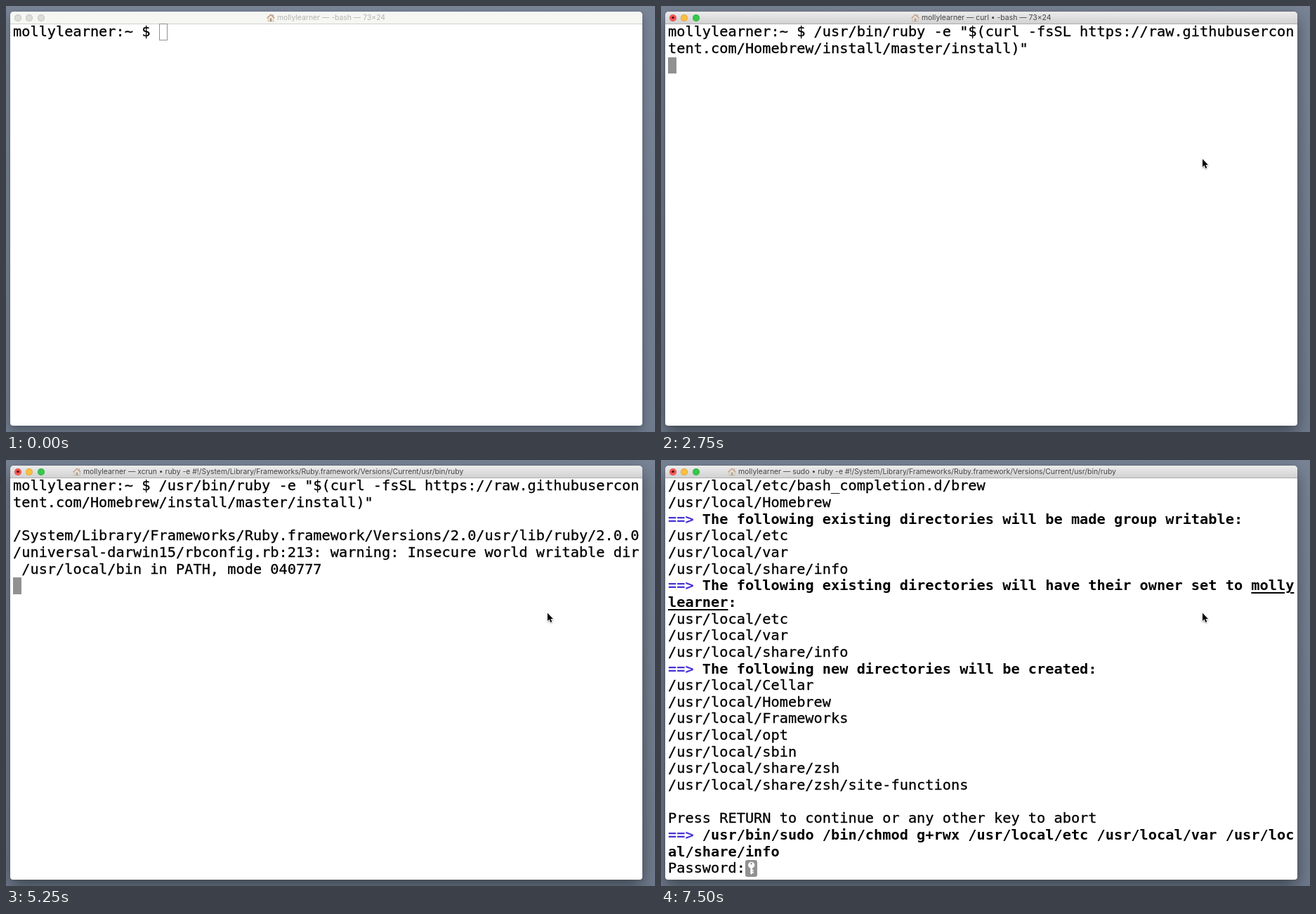
Recreate the animation shown at these times as an HTML page. Size 924 px wide and 606 px high, loop 8 s.

```html
<!DOCTYPE html>
<html lang="en">
<head>
<meta charset="utf-8">
<title>Terminal</title>
<style>
html, body { margin: 0; width: 100%; height: 100%; overflow: hidden; }
body { position: relative; background: linear-gradient(#788496, #6f7b8d); }
#window {
  position: absolute; left: 6px; top: 8px; width: 900px; height: 589px;
  border-radius: 5px 5px 4px 4px; background: #fff;
  box-shadow: 0 10px 24px rgba(0, 0, 0, .45), 0 0 1px rgba(0, 0, 0, .5);
}
#bar {
  box-sizing: border-box; height: 18px; border-radius: 5px 5px 0 0;
  background: linear-gradient(#ececec, #d2d2d2); border-bottom: 1px solid #adadad;
}
.light {
  position: absolute; top: 3.5px; width: 10px; height: 10px; border-radius: 50%;
  box-shadow: inset 0 0 0 .7px rgba(0, 0, 0, .15);
}
.close { left: 6px; background: #fc5b57; }
.minimize { left: 22.3px; background: #fdbe41; }
.zoom { left: 38.6px; background: #34c84a; }
.busy .close::after {
  content: ""; position: absolute; left: 3.2px; top: 3.2px;
  width: 3.6px; height: 3.6px; border-radius: 50%; background: #5c0503;
}
#title {
  position: absolute; top: 2px; height: 13px;
  font: 10.4px/13px Inter, Roboto, sans-serif; color: #444;
}
#title svg { position: absolute; left: 0; top: .5px; }
#label { position: absolute; left: 15px; top: 0; white-space: pre; }
.busy #title svg { opacity: .5; }
.inactive { box-shadow: 0 6px 14px rgba(0, 0, 0, .3), 0 0 1px rgba(0, 0, 0, .4) !important; }
.inactive #bar { background: #f6f7f3; border-color: #cfcfcf; }
.inactive .light { background: #dcdcda; }
.inactive #title { color: #b3b3b3; }
.inactive #title svg { opacity: .65; }
#screen {
  position: absolute; left: 10px; top: 25.3px; margin: 0; color: #000;
  font: 20.29px/23.65px "DejaVu Sans Mono", monospace;
  -webkit-text-stroke: .3px;
}
#screen b { -webkit-text-stroke: 0; }
#screen i { font-style: normal; color: #4632d5; }
#screen u { text-decoration-thickness: 1.6px; text-underline-offset: 2.5px; }
#caret { position: absolute; box-sizing: border-box; width: 12.2px; height: 23.6px; background: #919191; }
#caret svg { display: none; }
#caret.hollow { background: none; border: 1px solid #919191; }
#caret.secret { width: 17.5px; border-radius: 3px; }
#caret.secret svg { display: block; }
#pointer { position: absolute; filter: drop-shadow(0 1px .8px rgba(0, 0, 0, .35)); }
</style>
</head>
<body>
<div id="window">
  <div id="bar"></div>
  <span class="light close"></span><span class="light minimize"></span><span class="light zoom"></span>
  <div id="title">
    <svg width="12" height="12" viewBox="0 0 12 12">
      <path d="M2 5.5 6 2l4 3.5V11H2z" fill="#f0e3d0" stroke="#a48a70" stroke-width=".7"/>
      <path d="M8.5 1h1.4v3H8.5z" fill="#9b6a4c"/>
      <path d="M.6 6.3 6 1.3l5.4 5" fill="none" stroke="#a56a43" stroke-width="1.4"/>
      <path d="M4.7 6.5h2.6V11H4.7z" fill="#8d6448"/>
    </svg>
    <span id="label"></span>
  </div>
</div>
<pre id="screen"></pre>
<div id="caret">
  <svg width="17.5" height="23.6" viewBox="0 0 17.5 23.6">
    <path d="M7.3 10h2.8v9l-1.4 1.8-1.4-1.5zM10 14h2v1.6h-2zM10 16.8h2v1.6h-2z" fill="#fff"/>
    <circle cx="8.7" cy="7.3" r="4.6" fill="#fff"/>
    <circle cx="8.7" cy="5.2" r="1.2" fill="#919191"/>
  </svg>
</div>
<svg id="pointer" width="12" height="17" viewBox="0 0 12 17">
  <path d="M2 .8V12l2.5-2.4 1.9 4.3 1.9-.8-1.9-4.2h3.5z" stroke="#fff" stroke-width="1.4" paint-order="stroke"/>
</svg>
<script>
const LOOP = 8000, CELL = 12.215, ROW = 23.65, LEFT = 10, TOP = 25.3;
const $ = id => document.getElementById(id);
const user = 'mollylearner';
const heading = text => `<b><i>==></i> ${text}</b>`;
const local = names => names.split(' ').map(name => '/usr/local/' + name);

const prompt = user + ':~ $ ';
const command = prompt + `/usr/bin/ruby -e "$(curl -fsSL https://raw.githubusercon
tent.com/Homebrew/install/master/install)"
`;
const warning = `${command}
/System/Library/Frameworks/Ruby.framework/Versions/2.0/usr/lib/ruby/2.0.0
/universal-darwin15/rbconfig.rb:213: warning: Insecure world writable dir
 /usr/local/bin in PATH, mode 040777
`;
const existing = local('etc var share/info');
const log = [
  ...local('share/man/man1/brew.1 share/zsh/site-functions/_brew etc/bash_completion.d/brew Homebrew'),
  heading('The following existing directories will be made group writable:'),
  ...existing,
  heading(`The following existing directories will have their owner set to <u>${user.slice(0, 5)}</u>`),
  `<b><u>${user.slice(5)}</u>:</b>`,
  ...existing,
  heading('The following new directories will be created:'),
  ...local('Cellar Homebrew Frameworks opt sbin share/zsh share/zsh/site-functions'),
  '',
  'Press RETURN to continue or any other key to abort'
];
const password = [
  ...log.slice(2),
  heading('/usr/bin/sudo /bin/chmod g+rwx /usr/local/etc /usr/local/var /usr/loc'),
  '<b>al/share/info</b>',
  'Password:'
].join('\n');

const script = 'ruby -e #!/System/Library/Frameworks/Ruby.framework/Versions/Current/usr/bin/ruby';
const shell = '-bash — 73×24';
const scenes = [
  { at: 0, text: prompt, title: shell, x: 371, mode: 'inactive', caret: 'hollow' },
  { at: 1000, text: prompt, title: shell, x: 371 },
  { at: 2750, text: command, title: 'curl • ' + shell, x: 356, mode: 'busy' },
  { at: 4500, text: command + '\n', title: 'curl • ' + shell, x: 356, mode: 'busy' },
  { at: 5000, text: command + '\n', title: script, x: 95, mode: 'busy' },
  { at: 5250, text: warning, title: 'xcrun • ' + script, x: 95, mode: 'busy' },
  { at: 5500, text: log.join('\n') + '\n', title: 'sw_vers • ' + script, x: 95, mode: 'busy' },
  { at: 5750, text: password, title: 'sudo • ' + script, x: 95, mode: 'busy', caret: 'secret' }
];
const pointerStops = [
  { at: 0 },
  { at: 250, x: 853, y: 228 },
  { at: 500, x: 787, y: 222 },
  { at: 750, x: 769, y: 217 }
];
const current = (list, time) => list.findLast(item => item.at <= time);

function showScene({ text, title, x, mode = '', caret = '' }) {
  const lines = text.split('\n');
  $('window').className = mode;
  $('title').style.left = x - 6 + 'px';
  $('label').textContent = `${user} — ${title}`;
  $('screen').innerHTML = text;
  $('caret').className = caret;
  $('caret').style.left = LEFT + lines.at(-1).length * CELL + 'px';
  $('caret').style.top = TOP + (lines.length - 1) * ROW + 'px';
}

function showPointer({ x, y }) {
  const style = $('pointer').style;
  style.display = x ? 'block' : 'none';
  style.left = x + 'px';
  style.top = y + 'px';
}

const start = performance.now();
let shown;
function draw() {
  const time = (performance.now() - start) % LOOP;
  const scene = current(scenes, time);
  if (scene !== shown) showScene(shown = scene);
  showPointer(current(pointerStops, time));
  requestAnimationFrame(draw);
}
draw();
</script>
</body>
</html>
```
